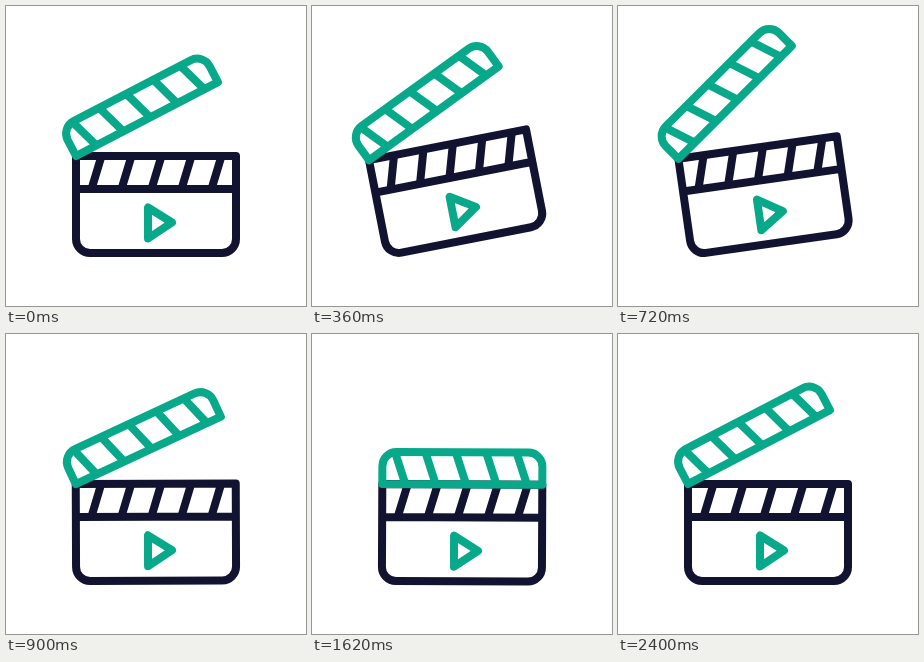
An HTML page for the animation above (2.49 s loop, 300 by 300 pixels).

```html
<!DOCTYPE html>
<html lang="en">
<head>
<meta charset="utf-8">
<title>Clapperboard</title>
<style>
  html, body { margin: 0; width: 100%; height: 100%; overflow: hidden; background: #fff; }
  svg { display: block; width: 100vw; height: 100vh; fill: none; stroke-width: 8; stroke-linejoin: round; }
  .navy { stroke: #121331; }
  .green { stroke: #08a88a; }
</style>
</head>
<body>
<svg viewBox="0 0 300 300">
  <g id="board">
    <path class="navy" d="M70 150H230V233a14 14 0 0 1-14 14H84a14 14 0 0 1-14-14ZM70 183H230"/>
    <path class="navy" id="boardStripes"/>
    <path class="green" d="M142 201.5V232.5L166 216.5Z"/>
    <g id="clap" class="green">
      <path d="M70 150V132a14 14 0 0 1 14-14H216a14 14 0 0 1 14 14V150Z"/>
      <path id="clapStripes"/>
    </g>
  </g>
</svg>
<script>
const LOOP = 2490, STEP = 30;
const el = id => document.getElementById(id);

const stripes = (x, y, dx, dy, gap) =>
  Array.from({ length: 5 }, (_, i) => `M${x + gap * i} ${y}l${dx} ${dy}`).join('');
el('boardStripes').setAttribute('d', stripes(95.5, 150, -10, 33, 30));
el('clapStripes').setAttribute('d', stripes(82.5, 118, 10.5, 32, 30.4));

const smooth = u => (1 - Math.cos(Math.PI * u)) / 2;
const speedUp = u => u * u;
const slowDown = u => 1 - (1 - u) ** 2;

// Keys: [time in ms, angle in degrees, easing towards this key]
const boardKeys = [
  [0, 0], [120, 5.2], [450, -14.5], [540, -14.5], [930, 0],
  [1590, 0], [1800, 5.2], [2070, 0], [LOOP, 0]
];
const clapKeys = [
  [0, -27.5], [210, -17], [570, -38], [640, -38], [1080, 0, speedUp],
  [1190, -1.4, slowDown], [1320, 0, speedUp],
  [1865, 0], [2150, -36.5], [2400, -27.5], [LOOP, -27.5]
];

function angleAt(keys, t) {
  const i = keys.findIndex(key => key[0] > t);
  const [t0, a0] = keys[i - 1], [t1, a1, ease = smooth] = keys[i];
  return a0 + (a1 - a0) * ease((t - t0) / (t1 - t0));
}

const rotate = (id, angle, x, y) =>
  el(id).setAttribute('transform', `rotate(${angle} ${x} ${y})`);

function draw(now) {
  const t = Math.min(Math.floor((now % LOOP) / STEP) * STEP, 2400);
  rotate('board', angleAt(boardKeys, t), 85, 219);
  rotate('clap', angleAt(clapKeys, t), 70, 150);
}

const start = performance.now();
function tick() {
  draw(performance.now() - start);
  requestAnimationFrame(tick);
}
tick();
</script>
</body>
</html>
```
